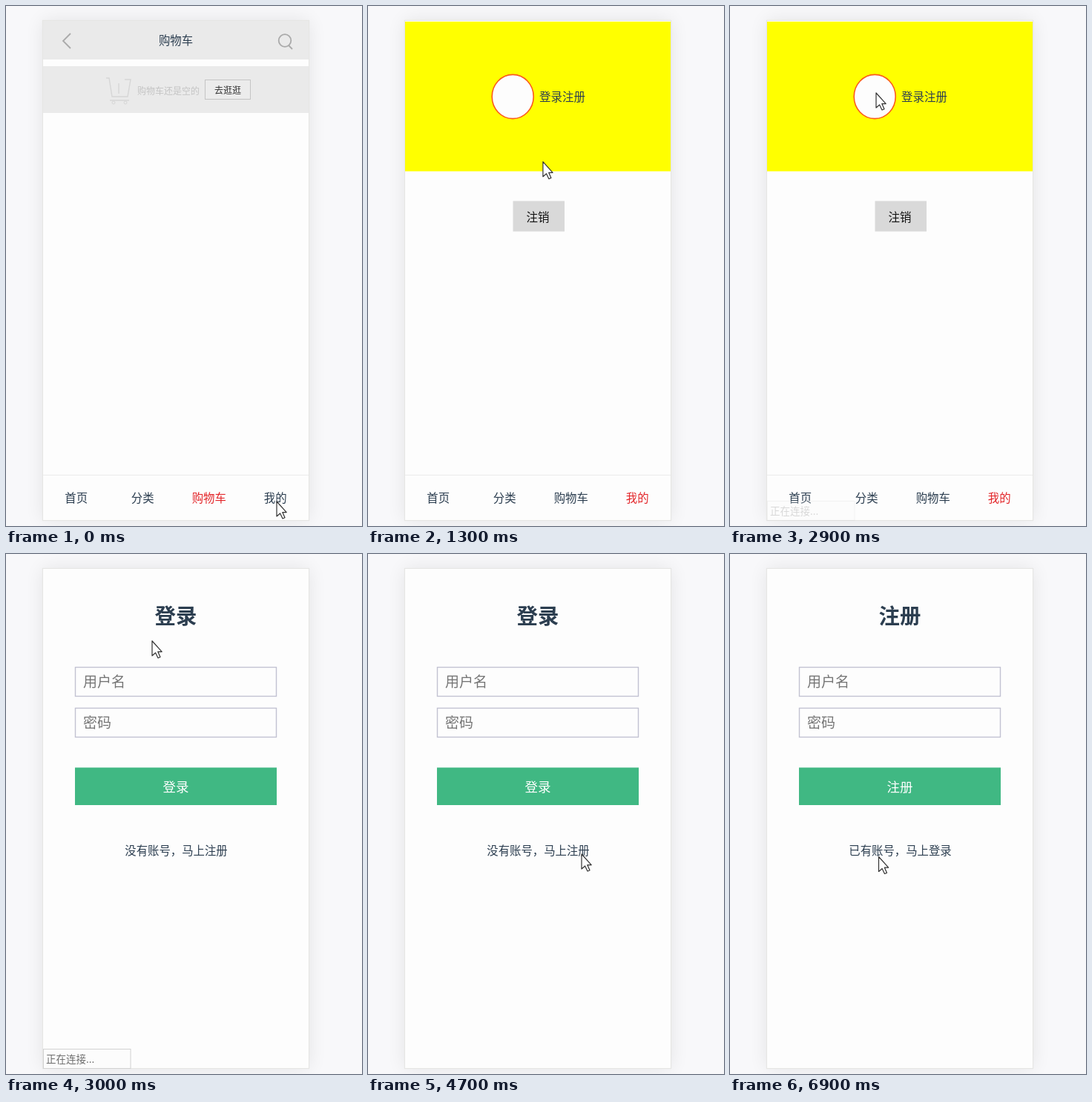
An HTML page that plays this animation: 480 px wide and 700 px high, repeating every 7000 ms.

```html
<!DOCTYPE html>
<html lang="zh-CN">
<head>
<meta charset="utf-8">
<style>
html, body { margin: 0; width: 100%; height: 100%; overflow: hidden; background: #f8f8fa; }
#phone { position: absolute; left: 50px; top: 20px; width: 358px; height: 672px;
  background: #fdfdfd; box-shadow: 0 0 1px 1px #e6e6e4, 0 0 24px rgba(0, 0, 0, .09); }
svg { position: absolute; left: 0; top: 0; width: 480px; height: 700px; }
text { font-family: "Noto Sans CJK SC", "Noto Sans CJK", "Noto Sans", sans-serif; }
</style>
</head>
<body>
<div id="phone"></div>
<svg id="stage" viewBox="0 0 480 700"></svg>
<script>
const LOOP = 7000, STEP = 100;
const LEFT = 50, WIDTH = 358, MID = LEFT + WIDTH / 2;
const INK = '#2c3e50', RED = '#e3262a', PAPER = '#fdfdfd', GREEN = '#40b883', GREY = '#eaeaea';
const stage = document.getElementById('stage');

function add(parent, tag, attrs, content) {
  const el = document.createElementNS('http://www.w3.org/2000/svg', tag);
  for (const k in attrs) el.setAttribute(k, attrs[k]);
  if (content) el.textContent = content;
  parent.appendChild(el);
  return el;
}
const group = () => add(stage, 'g', {});
const rect = (g, x, y, width, height, fill, stroke = 'none') =>
  add(g, 'rect', { x, y, width, height, fill, stroke });
const line = (g, d, stroke, width) =>
  add(g, 'path', { d, stroke, fill: 'none', 'stroke-width': width });
const ring = (g, cx, cy, r, stroke, width) =>
  add(g, 'circle', { cx, cy, r, stroke, fill: 'none', 'stroke-width': width });

// Text placed by the vertical middle of its glyphs
function label(g, x, mid, size, text, fill = INK, anchor = 'middle', weight = 400) {
  return add(g, 'text', { x, y: mid + size * .38, 'font-size': size, fill,
    'text-anchor': anchor, 'font-weight': weight }, text);
}

function cartPage() {
  const g = group(), icon = '#aaaaaa', pale = '#d6d6d6';
  rect(g, LEFT, 20, WIDTH, 52, GREY);
  line(g, 'M87 37L77 47L87 57', icon, 1.8);
  label(g, MID, 46.5, 15.4, '购物车');
  ring(g, 376, 46.5, 8.3, icon, 1.8);
  line(g, 'M381 53L386 58', icon, 1.8);
  rect(g, LEFT, 81, WIDTH, 63, GREY);
  line(g, 'M135 97H139L143 122H164L168 99H160M152 104V118M140 127H166', pale, 1.4);
  ring(g, 145, 130, 2, pale, 1);
  ring(g, 161, 130, 2, pale, 1);
  label(g, 177, 114, 12, '购物车还是空的', '#c4c4c4', 'start');
  rect(g, 268.5, 99.5, 61, 26, '#ececec', '#c4c4c4');
  label(g, 299, 113.5, 12, '去逛逛', '#333');
  return g;
}

function userPage() {
  const g = group();
  rect(g, LEFT, 21, WIDTH, 201.5, '#ffff00');
  add(g, 'ellipse', { cx: 195.2, cy: 122, rx: 28, ry: 29.6, fill: PAPER,
    stroke: '#fb5a1c', 'stroke-width': 1.6 });
  label(g, 231, 122.5, 15.5, '登录注册', INK, 'start');
  rect(g, 195.5, 262.5, 69.5, 41, '#d9d9d9');
  label(g, MID, 284, 15.5, '注销', '#111');
  return g;
}

function formPage(title, hint) {
  const g = group();
  label(g, MID, 83.5, 28.4, title, INK, 'middle', 700);
  ['用户名', '密码'].forEach((text, i) => {
    const y = 152.5 + 55 * i;
    rect(g, 93.5, y, 271, 39, PAPER, '#c2c2d2').setAttribute('stroke-width', 1.4);
    label(g, 104, y + 19.5, 19, text, '#757575', 'start');
  });
  rect(g, 93, 287.5, 272, 50.5, GREEN);
  label(g, MID, 313, 17.5, title, '#fff', 'middle', 500);
  label(g, MID + .5, 399.5, 15.4, hint);
  return g;
}

const pages = [
  cartPage(),
  userPage(),
  formPage('登录', '没有账号，马上注册'),
  formPage('注册', '已有账号，马上登录')
];

const nav = group();
line(nav, `M${LEFT} 631.5h${WIDTH}`, '#ececec', 1);
const tabs = ['首页', '分类', '购物车', '我的'].map((text, i) =>
  label(nav, LEFT + WIDTH / 4 * (i + .5), 662, 15.4, text));

const status = group();
rect(status, 50.5, 666.5, 117.5, 26, '#fcfcfc', '#d2d2d2');
label(status, 54, 679.5, 13.5, '正在连接...', '#6c6c6c', 'start');

const cursor = add(stage, 'path', {
  d: 'M0 0V20L4.6 16L8 23L11 21.7L7.8 14.6H13.2Z',
  fill: '#fff', stroke: '#333', 'stroke-width': 1.2, 'stroke-linejoin': 'round'
});

// Each click opens the next page one step later
const clicks = [100, 2900, 4900];
const home = { x: 365, y: 667 };
const moves = [
  { from: 700, to: 1500, x: 212, y: 125 },
  { from: 2200, to: 2500, x: 197, y: 117 },
  { from: 3100, to: 3600, x: 219, y: 357 },
  { from: 3600, to: 4000, x: 303, y: 400 },
  { from: 4100, to: 4400, x: 288, y: 404 },
  { from: 5400, to: 6200, x: 181, y: 362 },
  { from: 6300, to: 6900, x: 200.5, y: 407.5 }
];

function ease(k) {
  k = Math.min(1, Math.max(0, k));
  return k * k * (3 - 2 * k);
}

function cursorAt(t) {
  let { x, y } = home;
  for (const m of moves) {
    const k = ease((t - m.from) / (m.to - m.from));
    x += (m.x - x) * k;
    y += (m.y - y) * k;
  }
  return [x, y];
}

// The bubble fades in on a click that loads over the network, then vanishes
function statusAt(t) {
  const age = Math.min(...clicks.slice(0, 2).filter(c => c <= t).map(c => t - c));
  return age >= 700 ? 0 : age < STEP ? .25 : 1;
}

function draw(now) {
  const t = Math.floor((now % LOOP) / STEP) * STEP;
  const page = clicks.filter(c => t >= c + STEP).length;
  pages.forEach((g, i) => g.style.display = i === page ? '' : 'none');
  nav.style.display = page < 2 ? '' : 'none';
  tabs.forEach((tab, i) => tab.setAttribute('fill', i === page + 2 ? RED : INK));
  status.setAttribute('opacity', statusAt(t));
  cursor.setAttribute('transform', `translate(${cursorAt(t)})`);
}

const start = performance.now();
function tick() {
  draw(performance.now() - start);
  requestAnimationFrame(tick);
}
tick();
</script>
</body>
</html>
```
